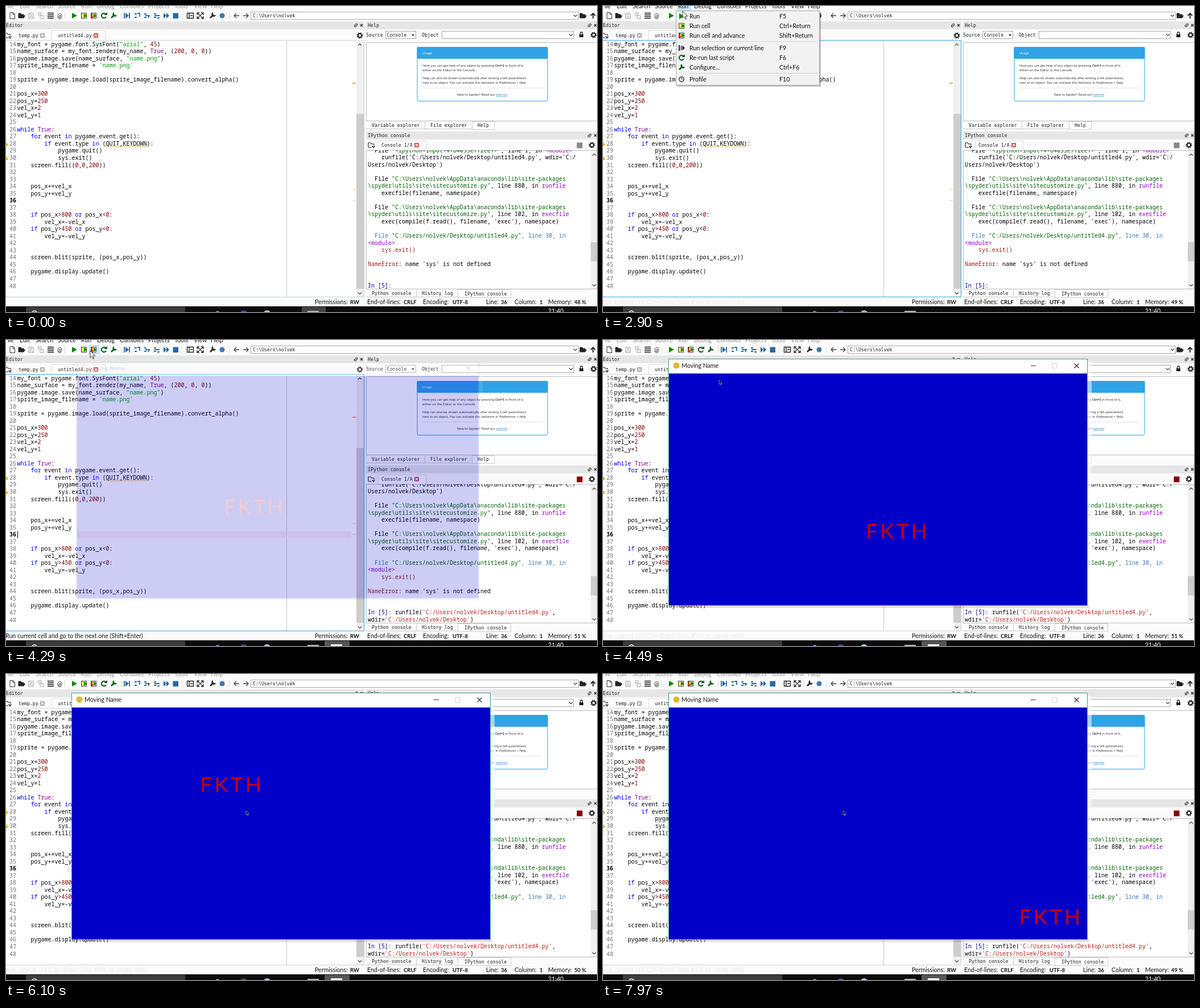
Write an HTML page that moves like this. It is 1039 px wide and 539 px high and loops after 8 s.

```html
<!DOCTYPE html>
<html lang="en">
<head>
<meta charset="utf-8">
<title>Moving Name</title>
<style>
html, body { margin: 0; width: 100%; height: 100%; overflow: hidden; background: #fbfbfb; }
svg { display: block; width: 1039px; height: 539px; }
text { white-space: pre; font: 10.6px Lato, "Open Sans", sans-serif; fill: #111; }
.code { font: 500 10px "Noto Sans Mono", "DejaVu Sans Mono", monospace; fill: #000; }
.mono { font: 8.25px "DejaVu Sans Mono", "Noto Sans Mono", monospace; fill: #222; }
.tiny { font: 5.7px "Noto Sans", "Open Sans", sans-serif; fill: #333; }
.name { font: 37px Lato, "Liberation Sans", sans-serif; letter-spacing: 4px; fill: #c80000; }
.b { font-weight: 700; }
</style>
</head>
<body>
<svg id="stage" viewBox="0 0 1039 539" xmlns="http://www.w3.org/2000/svg"></svg>
<script>
const esc = s => String(s).replace(/&/g, '&amp;').replace(/</g, '&lt;').replace(/>/g, '&gt;');
const text = (x, y, s, cls = '', extra = '') => `<text x="${x}" y="${y}" class="${cls}" ${extra}>${esc(s)}</text>`;
const rect = (x, y, w, h, fill, stroke = 'none', extra = '') =>
  `<rect x="${x}" y="${y}" width="${w}" height="${h}" fill="${fill}" stroke="${stroke}" ${extra}/>`;
const path = (d, stroke = '#333', width = 1, fill = 'none') =>
  `<path d="${d}" stroke="${stroke}" stroke-width="${width}" fill="${fill}"/>`;
const disc = (x, y, r, fill) => `<circle cx="${x}" cy="${y}" r="${r}" fill="${fill}"/>`;
const group = (id, body, extra = '') => `<g id="${id}" ${extra}>${body}</g>`;
const span = (s, color) => `<tspan fill="${color}">${esc(s)}</tspan>`;

const LINE = 12.53;
const USER = 'nolvek';

// ---------- small icons ----------
const gear = (x, y) => `<circle cx="${x}" cy="${y}" r="3.2" fill="none" stroke="#222" stroke-width="2"/>` +
  `<circle cx="${x}" cy="${y}" r="4.8" fill="none" stroke="#222" stroke-width="1.5" stroke-dasharray="1.9 1.87"/>`;
const folder = (x, y) => path(`M${x - 5} ${y + 4}v-8h4l1 2h4v2M${x - 5} ${y + 4}l2.500-4h9l-2.500 4z`, '#222', 1, '#222');
const outlineFolder = (x, y) => path(`M${x - 5} ${y + 4}v-8h4l1.500 2h4.500v2M${x + 1} ${y + 4}h-6M${x + 2} ${y + 2}h4l-2 3z`, '#222', 1.1);
const play = (x, y) => path(`M${x - 4} ${y - 5}l9 5-9 5z`, 'none', 0, '#008a00');
const wrench = (x, y, c) => path(`M${x - 4} ${y + 4}l6-6`, c, 2.6) + path(`M${x + 1} ${y - 5}a3 3 0 1 0 4 4`, c, 2);
const cell = (x, y, advance) => rect(x - 5.5, y - 4.5, 9, 9, '#fdf28a', '#444') + path(`M${x - 5} ${y - 2}h8M${x - 5} ${y + 2}h8`, '#c8a800') +
  path(`M${x - 1} ${y - 3.500}l6 3.500-6 3.500z`, 'none', 0, '#008a00') +
  (advance ? path(`M${x - 4} ${y - 4}v7M${x - 6} ${y + 1}l2 3 2-3`, '#e02020', 1.6) : '');
const rerun = (x, y) => path(`M${x + 4} ${y - 2}a4.300 4.300 0 1 0 0 4`, '#0a5a1a', 2) + path(`M${x} ${y - 1}h6v-5z`, 'none', 0, '#0a5a1a');
const paneButtons = (x, y) => rect(x - 2.5, y - .5, 3, 3, 'none', '#333') + path(`M${x - 1} ${y - 2.500}h3.500v3.500`) +
  path(`M${x + 8} ${y - 2}l4 4m0-4l-4 4`, '#222', 1.2);
const paneTitle = (x, y, w, s) => rect(x, y, w, 14, '#e6e6e6') + text(Math.max(0, x + 3), y + 10, s, 'mono') +
  paneButtons(x + w - 15, y + 7);
const tabClose = (x, y, c) => rect(x - 4, y - 4, 8, 8, c, 'none', 'rx="1"') + path(`M${x - 2} ${y - 2}l4 4m0-4l-4 4`, '#fff', 1.2);
const chevron = (x, y, dir) => path(`M${x - 3} ${y - dir * 1.500}l3 ${dir * 3} 3 ${-dir * 3}`, '#444', 1.2);

function toolbar() {
  const blue = '#2667a8';
  const step = (x, d) => path(`M${x - 5} ${14}h4M${x - 5} 20h4`, blue, 2) + path(d, blue, 1.8);
  return path('M7 11.500h5.500l3 3v8h-8.500z M12 11.500v3h3') + folder(27, 17) +
    path('M39.500 12.500h7l2 2v7.500h-9z M42 12.500v3h4v-3 M42 22v-4h4v4', '#aaa') +
    path('M57 12h5v4h-5z M60 17h6v5h-6z', '#bbb', 1.3) +
    path('M73 12.500h11M73 15.500h11M73 18.500h11M73 21.500h11', '#222', 1.4) + text(90, 20.5, '@') +
    play(120, 17) + cell(138, 17) + cell(155, 17, true) + rerun(172, 17) + wrench(189, 17, '#0a5a1a') +
    path('M208 12v10M217 12v10', blue, 1.8) + path('M210 12l6 5-6 5z', 'none', 0, blue) +
    step(231, 'M231 13h4v6M227 20h2') + step(248, 'M245 17h7l-2 4') + step(265, 'M261 17h9M266 21h4') +
    path('M277 12l5 5-5 5zM282 12l5 5-5 5z', 'none', 0, blue) + rect(293.5, 12.5, 9.5, 9.5, blue) +
    path('M318.500 12.500h11v9h-11z M322 12v10 M324 17h4', '#222', 1.4) + path('M337 13l9 8M346 13l-9 8M336 16v-4h4M347 16v-4h-4M336 18v4h4M347 18v4h-4', '#222', 1.3) +
    wrench(363, 17, '#222') + disc(380, 17, 4.5, '#3c78b4') +
    path('M410 17h-9m4-4l-4 4 4 4M417 17h9m-4-4l4 4-4 4', '#444', 1.4) +
    path('M103.500 11v12M202.500 11v12M309.500 11v12M352.500 11v12M392.500 11v12', '#ddd') +
    rect(430.5, 10.5, 576, 13, '#fff', '#aaa') + text(434, 20, `C:\\Users\\${USER}`, 'mono') + chevron(1001, 17, 1) +
    folder(1014, 17) + path('M1032 22v-9m-4 4l4-4 4 4', '#222', 1.8);
}

// ---------- editor ----------
const SOURCE = `my_font = pygame.font.SysFont("arial", 45)
name_surface = my_font.render(my_name, True, (200, 0, 0))
pygame.image.save(name_surface, "name.png")
sprite_image_filename = 'name.png'

sprite = pygame.image.load(sprite_image_filename).convert_alpha()

pos_x=300
pos_y=250
vel_x=2
vel_y=1

while True:
    for event in pygame.event.get():
        if event.type in (QUIT,KEYDOWN):
            pygame.quit()
            sys.exit()
    screen.fill((0,0,200))


    pos_x+=vel_x
    pos_y+=vel_y


    if pos_x>800 or pos_x<0:
        vel_x=-vel_x
    if pos_y>450 or pos_y<0:
        vel_y=-vel_y


    screen.blit(sprite, (pos_x,pos_y))

    pygame.display.update()

`.split('\n');

function highlight(line) {
  const token = /("[^"]*"|'[^']*')|\b(while|for|in|if|or)\b|\b(True)\b|\b(\d+)\b/;
  let out = '', rest = line, m;
  while ((m = token.exec(rest))) {
    const color = m[1] ? '#00a000' : m[2] ? '#0000ff' : m[3] ? '#900090' : '#900000';
    out += esc(rest.slice(0, m.index)) + span(m[0], color);
    rest = rest.slice(m.index + m[0].length);
  }
  return out + esc(rest);
}

function editor() {
  let s = paneTitle(-3, 27, 633, 'Editor') +
    rect(80.5, 43.5, 94, 18, '#fff', '#ddd') + outlineFolder(3, 52) +
    text(22, 55, 'temp.py', 'mono') + tabClose(64, 52, '#aaa') +
    text(91, 55, 'untitled4.py', 'mono') + tabClose(158, 52, '#d9534f') + gear(622, 52) +
    rect(-1, 60.5, 630.5, 452, '#fff', '#c8d4da', 'id="editorFrame"') + path('M493.500 62v450', '#c8c8c8') +
    rect(616, 62, 13, 450, '#f0f0f0') + rect(616, 190, 13, 308, '#cdcdcd') + chevron(622, 68, -1) + chevron(622, 506, 1) +
    rect(609, 135, 6, 2, '#f0b040') + rect(609, 323, 6, 1, '#f5d08a') + rect(609, 342, 6, 1, '#f5d0a0') +
    path('M-3 246l4-6 3 6zM-3 271l4-6 3 6z', 'none', 0, '#f0b000') +
    path('M175 247.500q1.500-2 3 0' + 't3 0'.repeat(24), '#e89a20', .9);
  SOURCE.forEach((line, i) => {
    const y = 70.5 + i * LINE, n = i + 14;
    s += text(6, y, n, 'code' + (n === 36 ? ' b' : ''), n === 36 ? '' : 'style="fill:#707070"');
    s += `<text x="19.5" y="${y}" class="code">${highlight(line)}</text>`;
  });
  return s;
}

// ---------- right side ----------
function help() {
  return paneTitle(633, 27, 408, 'Help') +
    text(633, 54, 'Source', 'mono') + rect(667.5, 44.5, 53, 13, '#fff', '#aaa') + text(669.5, 54, 'Console', 'mono') +
    path('M713 50h5l-2.500 3z', 'none', 0, '#222') + text(731, 54, 'Object', 'mono') +
    rect(766.5, 44.5, 231, 13, '#fff', '#aaa') + chevron(993, 51, 1) +
    rect(1008, 50, 7, 5, '#222') + path('M1009.500 50v-2a2 2 0 0 1 4 0v2', '#222', 1.3) + gear(1033, 51) +
    rect(633.5, 64.5, 410, 138, '#fff', '#bbb') +
    rect(723, 72.5, 229, 95, '#fff', '#30a3e6', 'rx="2"') + rect(722.5, 72, 230, 21, '#30a3e6', 'none', 'rx="2"') +
    text(732, 85, 'Usage', 'tiny', 'style="fill:#fff"') +
    `<text x="732" y="107" class="tiny">Here you can get help of any object by pressing <tspan font-weight="700">Ctrl+I</tspan> in front of it,</text>` +
    text(732, 115, 'either on the Editor or the Console.', 'tiny') +
    text(732, 129, 'Help can also be shown automatically after writing a left parenthesis', 'tiny') +
    `<text x="732" y="136.500" class="tiny">next to an object. You can activate this behavior in <tspan font-style="italic">Preferences &gt; Help</tspan>.</text>` +
    path('M732 144.500h212', '#e4e4e4') +
    `<text x="837" y="158" class="tiny" text-anchor="middle">New to Spyder? Read our <tspan fill="#2080c8" text-decoration="underline">tutorial</tspan></text>` +
    rect(819.5, 203.5, 39, 14, '#fff', '#ccc') + path('M633 216.500h186M736.500 204v12', '#ccc') +
    text(643, 213, 'Variable explorer', 'mono') + text(746, 213, 'File explorer', 'mono') + text(829, 213, 'Help', 'mono');
}

const COLORS = { k: '#000', g: '#006400', p: '#9600c8', c: '#3c78b4', r: '#a52020', n: '#000080', s: '#c02020' };
const SITE = `g"C:\\Users\\${USER}\\AppData\\anaconda\\lib\\site-packages`;
const LOG = [
  ['k  File ', 'g"<ipython-input-4-b4053e7f2eef>"', 'k, line 1, in ', 'p<module>'],
  [`k    runfile('C:/Users/${USER}/Desktop/untitled4.py', wdir='C:/`],
  [`kUsers/${USER}/Desktop')`], [],
  ['k  File ', SITE], ['g\\spyder\\utils\\site\\sitecustomize.py"', 'k, line 880, in ', 'prunfile'],
  ['k    execfile(filename, namespace)'], [],
  ['k  File ', SITE], ['g\\spyder\\utils\\site\\sitecustomize.py"', 'k, line 102, in ', 'pexecfile'],
  ["k    exec(compile(f.read(), filename, 'exec'), namespace)"], [],
  ['c  File ', `g"C:/Users/${USER}/Desktop/untitled4.py"`, 'c, line 30, in'], ['p<module>'],
  ['r    sys.exit()'], [], ['rNameError', "k: name 'sys' is not defined"], [], [], ['nIn [5]:'],
];

function consolePane() {
  const lines = LOG.map((parts, i) => `<text x="636" y="${257.7 + i * LINE}" class="code">` +
    parts.map(p => span(p.slice(1), COLORS[p[0]])).join('') + '</text>').join('');
  const command = `<text x="684" y="${257.7 + 19 * LINE}" class="code">runfile(${span(`'C:/Users/${USER}/Desktop/untitled4.py'`, COLORS.s)},</text>` +
    `<text x="636" y="${257.7 + 20 * LINE}" class="code">wdir=${span(`'C:/Users/${USER}/Desktop'`, COLORS.s)})</text>`;
  return paneTitle(633, 221, 408, 'IPython console') +
    rect(654.5, 237.5, 84, 17, '#fff', '#ddd') + outlineFolder(642, 245) + text(660, 248, 'Console 1/A', 'mono') + tabClose(722, 245, '#d9534f') +
    rect(1003.5, 240.5, 10, 10, '#888', 'none', 'id="stop"') + gear(1030, 245) +
    rect(633.5, 254.5, 410, 244, '#fff', '#bbb') +
    `<g clip-path="url(#consoleClip)">${group('log', lines + group('command', command))}</g>` +
    rect(1028, 255, 11, 243, '#f0f0f0') + rect(1028, 416, 11, 34, '#cdcdcd') + chevron(1034, 262, -1) + chevron(1034, 492, 1) +
    rect(794.5, 499.5, 93, 14, '#fff', '#ccc') + path('M633 512.500h161M721.500 500v12', '#ccc') +
    text(643, 509, 'Python console', 'mono') + text(731, 509, 'History log', 'mono') + text(806, 509.5, 'IPython console', 'mono');
}

function statusBar() {
  const fields = [[543, 'Permissions:', 605, 'RW'], [635, 'End-of-lines:', 699, 'CRLF'], [733, 'Encoding:', 785, 'UTF-8'],
    [844, 'Line:', 870, '36'], [894, 'Column:', 938, '1'], [953, 'Memory:', 999, '48 %']];
  return fields.map(([x, label, vx, value], i) => text(x, 525, label) +
    text(vx, 525, value, 'b', `style="font-size:9.5px" ${i === 5 ? 'id="memory"' : ''}`)).join('') +
    text(-1, 525, '', '', 'id="status"');
}

const taskbar = () => rect(0, 529, 1039, 10, '#0c0c0c') + rect(35, 530, 280, 9, '#3c3c3c') +
  '<circle cx="50" cy="542" r="5" fill="none" stroke="#fff" stroke-width="1.500"/>' +
  disc(372, 542, 4.5, '#e8c030') + disc(418, 543, 7, '#3a4a90') + disc(459, 543, 7, '#a0c8e8') +
  rect(520, 530, 42, 9, '#444', 'none', 'id="taskButton"') + rect(530, 537, 20, 2, '#bbb') +
  group('taskGame', rect(560, 530, 44, 9, '#555') + rect(571, 536, 20, 3, '#fff')) +
  text(953, 541, '21:40', '', 'style="fill:#fff"');

// ---------- menus ----------
const MENUS = [[-3, 'File'], [24, 'Edit'], [52, 'Search'], [91, 'Source'], [132, 'Run'], [160, 'Debug'], [200, 'Consoles'],
  [250, 'Projects'], [296, 'Tools'], [330, 'View'], [360, 'Help']];
const menuBar = () => MENUS.map(([x, s]) => text(x, 3.5, s, '', 'style="fill:inherit"')).join('');

function runMenu() {
  const items = [[18, 'Run', 'F5'], [35, 'Run cell', 'Ctrl+Return'], [52, 'Run cell and advance', 'Shift+Return'],
    [74, 'Run selection or current line', 'F9'], [91, 'Re-run last script', 'F6'], [108, 'Configure...', 'Ctrl+F6'], [129, 'Profile', 'F10']];
  return rect(131, 10, 252, 132, '#000', 'none', 'opacity=".25"') + rect(128.5, 8.5, 252, 131, '#f2f2f2', '#a8a8a8') +
    path('M152 62.500h226M152 118.500h226', '#d0d0d0') + play(138, 18) + cell(139, 35) + cell(139, 52, true) +
    path('M134 69v10', '#222', 2) + rect(136, 70, 4, 8, '#888') + path('M140 70l4 4-4 4z', 'none', 0, '#222') +
    rerun(138, 91) + wrench(138, 108, '#0a5a1a') + '<circle cx="138" cy="129" r="4.200" fill="none" stroke="#222" stroke-width="1.300"/>' + path('M138 126v3h2') +
    items.map(([y, label, key]) => text(152, y + 4, label) + text(310, y + 4, key)).join('');
}

// ---------- game window ----------
const gameWindow = () => rect(852, 38, 7, 435, '#fff', 'none', 'opacity=".55"') + rect(120, 468, 735, 4, '#000', 'none', 'opacity=".12"') +
  rect(115.5, 33.5, 736, 434, '#fff', '#3f9a90') + disc(129, 45, 5.5, '#e0b830') + text(138, 49, 'Moving Name') +
  path('M752 45.500h9') + path('M790 41.500h8v8h-8z', '#ccc') + path('M828.500 41.500l8 8m0-8l-8 8', '#222', 1.1) +
  rect(116, 59, 735, 408, '#0000c8') + `<g clip-path="url(#gameClip)">${text(0, 0, 'FKTH', 'name', 'id="name"')}</g>`;

const arrow = 'M0 0v13l3-2.800 2.200 5 2-.9-2.200-4.900h4.200z';
document.getElementById('stage').innerHTML =
  `<defs><clipPath id="consoleClip">${rect(634, 254, 394, 244, '#000')}</clipPath><clipPath id="gameClip">${rect(116, 59, 735, 408, '#000')}</clipPath></defs>` +
  rect(0, 0, 1039, 539, '#fbfbfb') +
  rect(130, 0, 25, 8, '#cce8ff', 'none', 'id="runOpen"') + group('menuBar', menuBar()) +
  rect(146.5, 9.5, 17, 15, '#d8ecfa', '#99cef0', 'id="hover"') + toolbar() + editor() +
  rect(20, 337, 1, 12, '#000', 'none', 'id="caret"') + rect(107, 336, 9, 13, '#f5ecfa', 'none', 'id="rowRest"') +
  help() + consolePane() + statusBar() + taskbar() + group('menu', runMenu()) +
  group('game', gameWindow()) + rect(125, 337, 482, 12, '#c8beeb', 'none', 'id="row" opacity=".8"') +
  group('pointer', path(arrow, '#222', .9, '#fff')) +
  group('beam', path('M-3.500-6.500h2.500l1 1 1-1h2.500M0-5.500v11M-3.500 6.500h2.500l1-1 1 1h2.500', '#000', 1.2));

// ---------- timeline ----------
const $ = Object.fromEntries([...document.querySelectorAll('[id]')].map(el => [el.id, el]));
const show = (el, on) => el.setAttribute('display', on ? 'inline' : 'none');
const DURATION = 8000;
// Bursts of screen updates: first time, last time, count
const BURSTS = [[600, 1340, 11], [1410, 2140, 11], [2220, 2520, 5], [2750, 2900, 3], [3290, 3520, 4], [3830, 3900, 2],
  [4290, 4290, 1], [4400, 4990, 8], [5050, 5050, 1], [5120, 5860, 11], [5940, 6730, 11], [6810, 7560, 10], [7630, 7970, 5]];
const POINTER = [[600, 990, 532], [750, 868, 508], [1000, 590, 395], [1150, 413, 344], [1340, 244, 273], [1500, 228, 210],
  [1900, 140, 30], [2140, 138, 15], [2520, 139, 4], [3290, 141, 14], [3520, 150, 20], [4290, 148, 19], [4400, 160, 35],
  [4800, 370, 205], [4990, 399, 227], [5050, 402, 229], [5200, 422, 241]];
const STEPS = [[4290, 15], [4990, 184], [5860, 441], [6100, 513], [6730, 701], [7560, 957], [7970, 1073]];

function snap(t) {
  const burst = BURSTS.filter(b => b[0] <= t).pop();
  if (!burst) return 0;
  const [start, end, count] = burst;
  const gap = (end - start) / (count - 1) || 1;
  return start + gap * Math.min(count - 1, Math.floor((t - start) / gap + .001));
}

function track(keys, t) {
  const i = keys.findIndex(k => k[0] > t);
  if (i === 0) return keys[0].slice(1);
  if (i < 0) return keys[keys.length - 1].slice(1);
  const a = keys[i - 1], b = keys[i], u = (t - a[0]) / (b[0] - a[0]);
  return a.slice(1).map((v, j) => v + (b[j + 1] - v) * u);
}

const bounce = (v, max) => max - Math.abs(v % (2 * max) - max);

function render(time) {
  const t = snap(time);
  const between = (a, b) => t >= a && t < b;
  const active = between(2750, 4400), running = t >= 3830, opening = between(4290, 4400);

  $.menuBar.style.fill = active ? '#111' : '#999';
  $.editorFrame.setAttribute('stroke', active ? '#3fa9e0' : '#c8d4da');
  show($.runOpen, between(2400, 3290));
  show($.hover, between(3440, 4400));
  show($.menu, between(2750, 3290));
  $.menu.setAttribute('opacity', t < 2800 ? .4 : t < 2880 ? .8 : 1);
  show($.caret, between(3830, 4400));
  show($.rowRest, t >= 4400);

  show($.command, running);
  $.log.setAttribute('transform', `translate(0 ${running ? -LINE : 0})`);
  $.stop.setAttribute('fill', running ? '#8b0000' : '#888');
  $.memory.textContent = (t < 1800 ? 48 : t < 3830 ? 49 : t < 5800 ? 51 : t < 7800 ? 50 : 49) + ' %';

  const advance = between(3440, 4400), hint = between(1900, 2300), ghost = between(2300, 3440) || t >= 4400;
  $.status.textContent = advance ? 'Run current cell and go to the next one (Shift+Enter)'
    : hint || ghost ? 'Run current cell (Ctrl+Enter) [Use #%% to create cells]' : '';
  $.status.setAttribute('opacity', ghost ? .07 : 1);

  show($.taskGame, t >= 4290);
  show($.taskButton, t < 2750);
  show($.game, t >= 4290);
  show($.row, opening);
  $.game.setAttribute('opacity', opening ? .2 : 1);
  $.game.setAttribute('transform', opening ? 'matrix(.96 0 0 .96 13.6 6.4)' : '');
  const n = Math.round(track(STEPS, t)[0]);
  $.name.setAttribute('x', 115.8 + .817 * bounce(300 + 2 * n, 800));
  $.name.setAttribute('y', 95 + .818 * bounce(250 + n, 450));

  const [x, y] = track(POINTER, t);
  const inText = between(900, 1800);
  show($.beam, inText);
  show($.pointer, t >= 600 && !inText);
  $.beam.setAttribute('transform', `translate(${x} ${y})`);
  $.pointer.setAttribute('transform', `translate(${x} ${y}) scale(${t >= 4400 ? .55 : .95})`);
  $.pointer.firstChild.setAttribute('fill', t >= 4400 ? '#000' : '#fff');
  $.pointer.firstChild.setAttribute('stroke', t >= 4400 ? '#fff' : '#222');
}

const origin = performance.now();
function tick() {
  render((performance.now() - origin) % DURATION);
  requestAnimationFrame(tick);
}
tick();
</script>
</body>
</html>
```
